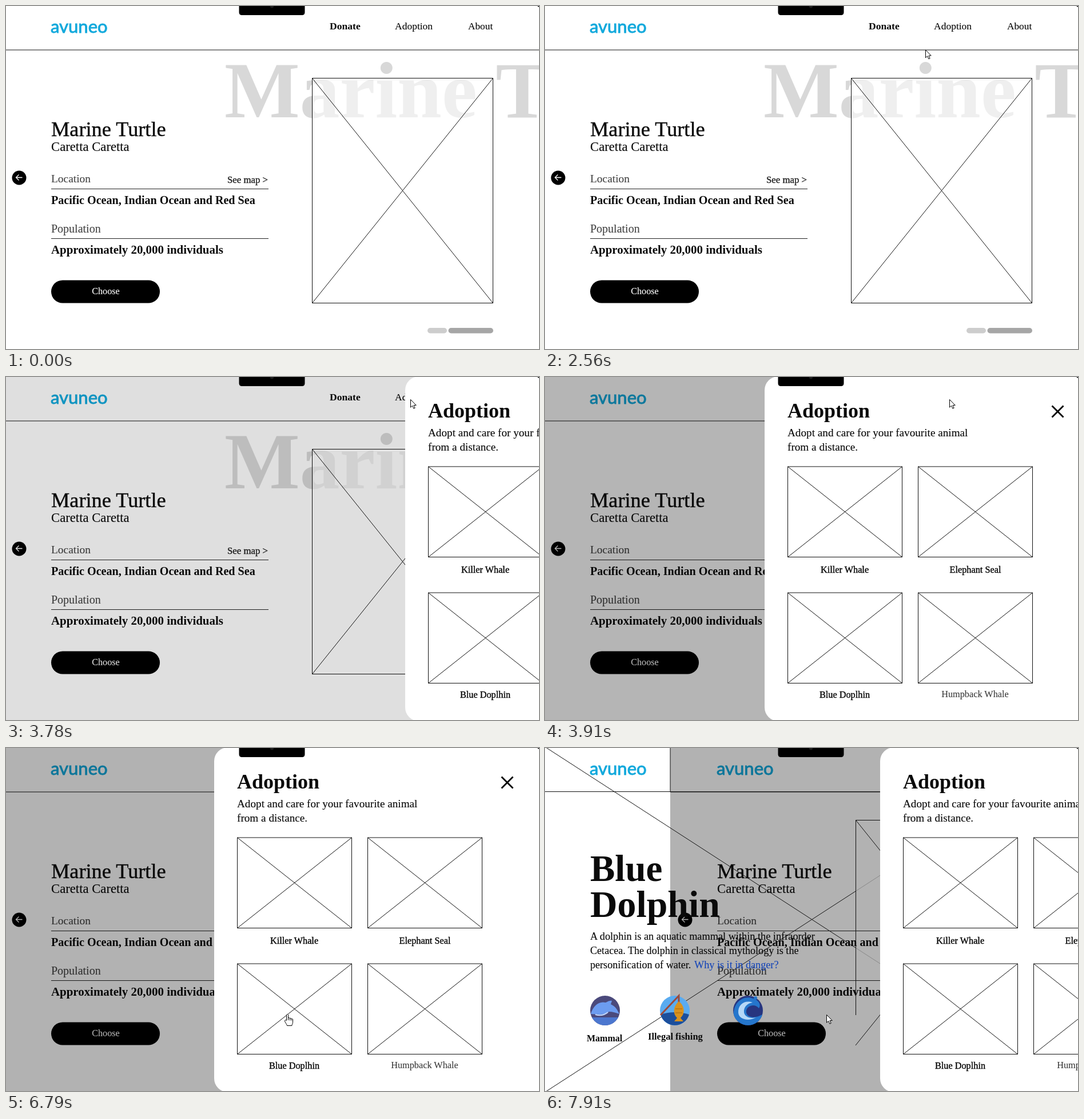
An HTML page that plays this animation: 932 by 601 pixels, repeating every 7.99 s.

```html
<!DOCTYPE html>
<html lang="en">
<head>
<meta charset="utf-8">
<title>Marine adoption prototype</title>
<style>
  html, body { margin: 0; width: 100%; height: 100%; overflow: hidden; background: #fff; }
  svg { display: block; width: 932px; height: 601px; }
  text { font-family: "Liberation Serif", "Times New Roman", serif; white-space: pre; }
  .logo { font-family: Lato, sans-serif; }
  .line { fill: none; stroke: #111; stroke-width: 1; }
</style>
</head>
<body>
<svg id="stage" viewBox="0 0 932 601" xmlns="http://www.w3.org/2000/svg"></svg>
<script>
const LOOP = 7990, STEP = 66, TICK = 67.5, SLIDE = 322;
const OPEN = 3640, LEAVE = 7840, TRAVEL = 568, WIDTH = 932;

// Markup helpers
function text(x, y, size, str, o = {}) {
  const { fill = '#0a0a0a', bold, anchor = 'start', heavy = 0.12, cls = '' } = o;
  return `<text class="${cls}" x="${x}" y="${y}" font-size="${size}" fill="${fill}"` +
    ` stroke="${fill}" stroke-width="${bold ? 0 : heavy}" text-anchor="${anchor}"` +
    `${bold ? ' font-weight="700"' : ''}>${str}</text>`;
}
const path = (d, attrs = 'class="line"') => `<path d="${d}" ${attrs}/>`;
const box = (x, y, w, h, attrs) => `<rect x="${x}" y="${y}" width="${w}" height="${h}" ${attrs}/>`;
const disc = (x, y, r, fill) => `<circle cx="${x}" cy="${y}" r="${r}" fill="${fill}"/>`;
const placeholder = (x, y, w, h) =>
  path(`M${x} ${y}h${w}v${h}h${-w}zl${w} ${h}m0 ${-h}l${-w} ${h}`);
const bold = { bold: true };

const logo = text(78, 47, 31, 'avuneo', { fill: '#12a9dc', heavy: 0.9, cls: 'logo' });

function turtlePage() {
  const grey = { fill: '#444' };
  return logo + path('M-3 0V77H932') +
    text(566, 41, 17.6, 'Donate', bold) +
    text(680, 41, 17.5, 'Adoption') +
    text(808, 41, 17.3, 'About') +
    text(382, 195, 139.6, 'Marine Turtle', { fill: '#d8d8d8', bold: true }) +
    box(536, 126.5, 316, 394, 'fill="#fff" fill-opacity=".6"') +
    placeholder(535.5, 126.5, 316, 394) +
    text(79, 228, 36.3, 'Marine Turtle', { heavy: 0.4 }) +
    text(79, 254, 22.7, 'Caretta Caretta') +
    text(79, 309, 19.4, 'Location', grey) +
    text(387, 310, 16.8, 'See map &gt;', { fill: '#222', heavy: 0.4 }) +
    path('M79 320.5H459M79 407.5H459', 'stroke="#222"') +
    text(79, 347, 20.1, 'Pacific Ocean, Indian Ocean and Red Sea', bold) +
    text(79, 397, 20, 'Population', grey) +
    text(79, 434, 20.9, 'Approximately 20,000 individuals', bold) +
    box(79, 480.5, 190, 40, 'rx="20"') +
    text(174.5, 505, 16.2, 'Choose', { fill: '#fff', anchor: 'middle' }) +
    disc(23, 301, 12.5, '#000') +
    path('M28.5 300.5H18M22.5 295.5L17.5 300.5L22.5 305.5', 'fill="none" stroke="#fff" stroke-width="1.3"') +
    box(737, 564, 34, 9.5, 'rx="4.75" fill="#cdcdcd"') +
    box(773.5, 564, 78.5, 9.5, 'rx="4.75" fill="#a6a6a6"');
}

function adoptionPanel() {
  const label = (x, y, str, o) => text(x, y, 16.3, str, { anchor: 'middle', heavy: 0.4, ...o });
  let out = box(364, -1, 700, 604, 'rx="24" fill="#fff"') +
    text(404, 71, 36, 'Adoption', bold) +
    text(404, 104, 19.2, 'Adopt and care for your favourite animal') +
    text(404, 129, 19.2, 'from a distance.') +
    path('M866.5 50.5l20 20m0 -20l-20 20', 'stroke="#000" stroke-width="2.8"');
  for (const x of [404.5, 632.5])
    for (const y of [157, 378]) out += placeholder(x, y, 200, 158.5);
  return out +
    label(504, 343, 'Killer Whale') +
    label(732.5, 343, 'Elephant Seal') +
    label(504, 562, 'Blue Doplhin') +
    label(732, 561, 'Humpback Whale', { fill: '#3a3a3a', heavy: 0.1 });
}

function icons() {
  const dolphin = disc(105, 460, 26, '#4b4a7c') +
    path('M82 472a26 26 0 0 0 46 0z', 'fill="#4c77cf"') +
    path('M80 466C84 452 94 443 106 446C111 443 115 442 117 443L115 449C124 453 127 460 130 466C124 464 118 462 112 462C100 470 90 466 80 466Z', 'fill="#6c9cf0"') +
    path('M88 467q12 4 22 -4', 'fill="none" stroke="#c3d8fb" stroke-width="2"');
  const fishing = disc(227, 460, 26, '#5aabf0') +
    path('M202 467a26 26 0 0 0 50 0q-25 -8 -50 0z', 'fill="#1c4f9c"') +
    path('M202 468L234 434V447', 'fill="none" stroke="#9c4a3c" stroke-width="3"') +
    path('M234 444C245 452 245 466 237 473L242 479H226L231 473C223 466 224 452 234 444Z', 'fill="#d9921f"') +
    path('M228 457h12M228 464h12', 'stroke="#a8640f"');
  const wave = disc(355, 460, 26, '#27357f') +
    path('M330 467C329 446 347 432 364 439C375 442 378 451 374 456C367 447 354 451 352 460C350 471 365 476 380 467A26 26 0 0 1 330 467Z', 'fill="#2576cc"') +
    path('M338 464C337 449 350 441 363 446C354 447 347 454 348 463C349 471 359 475 369 472C355 480 339 475 338 464Z', 'fill="#b5d8f7"') +
    disc(368, 438, 3, '#2576cc');
  return dolphin + fishing + wave;
}

function dolphinPage() {
  return path('M543 350L932 602M543 251L932 -1', 'stroke="#888"') +
    path('M0 -2L543 350M0 603L543 251') +
    path('M543.5 468V126.5H860M543.5 126.5L860 521M543 521L860 126.5') +
    logo + path('M0 76.5H932') +
    text(79, 233, 65, 'Blue', bold) +
    text(79, 296, 65.8, 'Dolphin', bold) +
    text(79, 336, 18.3, 'A dolphin is an aquatic mammal within the infraorder') +
    text(79, 361, 18.1, 'Cetacea. The dolphin in classical mythology is the') +
    text(79, 386, 18.1, 'personification of water.') +
    text(261, 386, 18.2, 'Why is it in danger?', { fill: '#1646b8' }) +
    icons() +
    text(73, 514, 16, 'Mammal', bold) +
    text(180, 511, 16.5, 'Illegal fishing', bold);
}

const cursorStyle = 'fill="#fff" stroke="#000" stroke-width="1" stroke-linejoin="round"';
const arrow = path('M.5 .5V14.2L3.7 11.3L5.9 16.3L8.1 15.3L6 10.5H10.2Z', cursorStyle);
const hand = path('M-1.5 10V1C-1.5 -1 1.5 -1 1.5 1V6.5C2 5.3 4.2 5.4 4.5 7C5 6 7 6.2 7.2 7.7' +
  'C8 7 9.5 7.5 9.5 9V13.5C9.5 16 8 17 7.8 19.5H-.5C-.8 17 -4.5 13.5 -4.5 11.2C-4.3 9.2 -2.5 9 -1.5 10.5Z' +
  'M1.5 6.5V10M4.5 7V10.3M7.2 7.7V10.6', cursorStyle);

const stage = document.getElementById('stage');
stage.innerHTML =
  `<g id="current">${turtlePage()}${box(-3, 0, 940, 601, 'id="scrim"')}</g>
   <g id="next">${dolphinPage()}</g>
   <g id="panel">${adoptionPanel()}</g>
   <path d="M407.5 0H522.5V11q0 5 -5 5H412.5q-5 0 -5 -5Z"/>
   ${disc(465, 0.5, 3, '#1d1d1d')}
   <path d="M929 0H932V2Z"/>
   <g id="cursor"><circle id="press" r="13" fill="#000" fill-opacity=".2"/>
     <g id="arrow">${arrow}</g><g id="hand">${hand}</g></g>`;
const el = id => document.getElementById(id);
const show = (id, on) => el(id).setAttribute('display', on ? 'inline' : 'none');
const move = (id, x, y = 0) => el(id).setAttribute('transform', `translate(${x} ${y})`);

// Timing
const clamp = v => Math.min(1, Math.max(0, v));
const linear = u => u;
const smooth = u => u * u * (3 - 2 * u);
const smoother = u => u * u * u * (u * (6 * u - 15) + 10);

// cubic-bezier(.42, 0, .58, 1)
function easeInOut(x) {
  x = clamp(x);
  let lo = 0, hi = 1;
  for (let i = 0; i < 24; i++) {
    const s = (lo + hi) / 2, r = 1 - s;
    if (1.26 * s * r * r + 1.74 * s * s * r + s * s * s < x) lo = s; else hi = s;
  }
  return smooth(lo);
}
function slide(t, start, lead) {
  if (t < start) return 0;
  const k = Math.floor((t - start) / STEP + 0.01);
  return easeInOut((k * TICK + lead) / SLIDE);
}

// Pointer strokes: first and last change, count of changes, start, bend, end
const strokes = [
  { a: 180, b: 390, n: 4, pts: [717, 599, 598, 552, 480, 506], ease: linear },
  { a: 1060, b: 1460, n: 7, pts: [480, 506, 432, 440, 401, 354], ease: smooth },
  { a: 1720, b: 2490, n: 12, pts: [401, 354, 510, 180, 655.5, 79], ease: smooth },
  { a: 2560, b: 2980, n: 7, pts: [655.5, 79, 690, 72, 707, 39], ease: linear },
  { a: 4640, b: 5330, n: 11, pts: [707, 39, 718, 160, 724.5, 275], ease: smooth },
  { a: 5660, b: 6430, n: 12, pts: [724.5, 276, 640, 155, 481, 456], ease: smoother },
  { a: 6500, b: 6790, n: 5, pts: [481, 456, 486, 463, 492, 467], ease: smooth }
];
function pointer(t) {
  const s = strokes.filter(q => t >= q.a).pop();
  if (!s) return null;
  const k = Math.floor((t - s.a) / (s.b - s.a) * (s.n - 1) + 0.01);
  const u = s.ease(clamp((k + 1) / s.n)), r = 1 - u, p = s.pts;
  const at = i => r * r * p[i] + 2 * r * u * p[i + 2] + u * u * p[i + 4];
  return [at(0), at(1)];
}

function draw(t) {
  const open = slide(t, OPEN, 9.5);
  const leave = Math.round(slide(t, LEAVE, 41.3) * WIDTH);
  move('panel', Math.round((1 - open) * TRAVEL) + leave);
  move('current', leave);
  el('scrim').setAttribute('fill-opacity', 0.302 * open);
  show('next', t >= LEAVE);

  const pos = pointer(t);
  show('cursor', pos);
  if (!pos) return;
  const [x, y] = pos;
  const overCard = t > 5660 && t < LEAVE && x < 605 && y > 378;
  move('cursor', x, y);
  show('hand', overCard);
  show('arrow', !overCard);
  show('press', (t >= 3440 && t < OPEN) || (t >= 7650 && t < LEAVE));
}

const begin = performance.now();
function frame() {
  draw((performance.now() - begin) % LOOP);
  requestAnimationFrame(frame);
}
frame();
</script>
</body>
</html>
```
